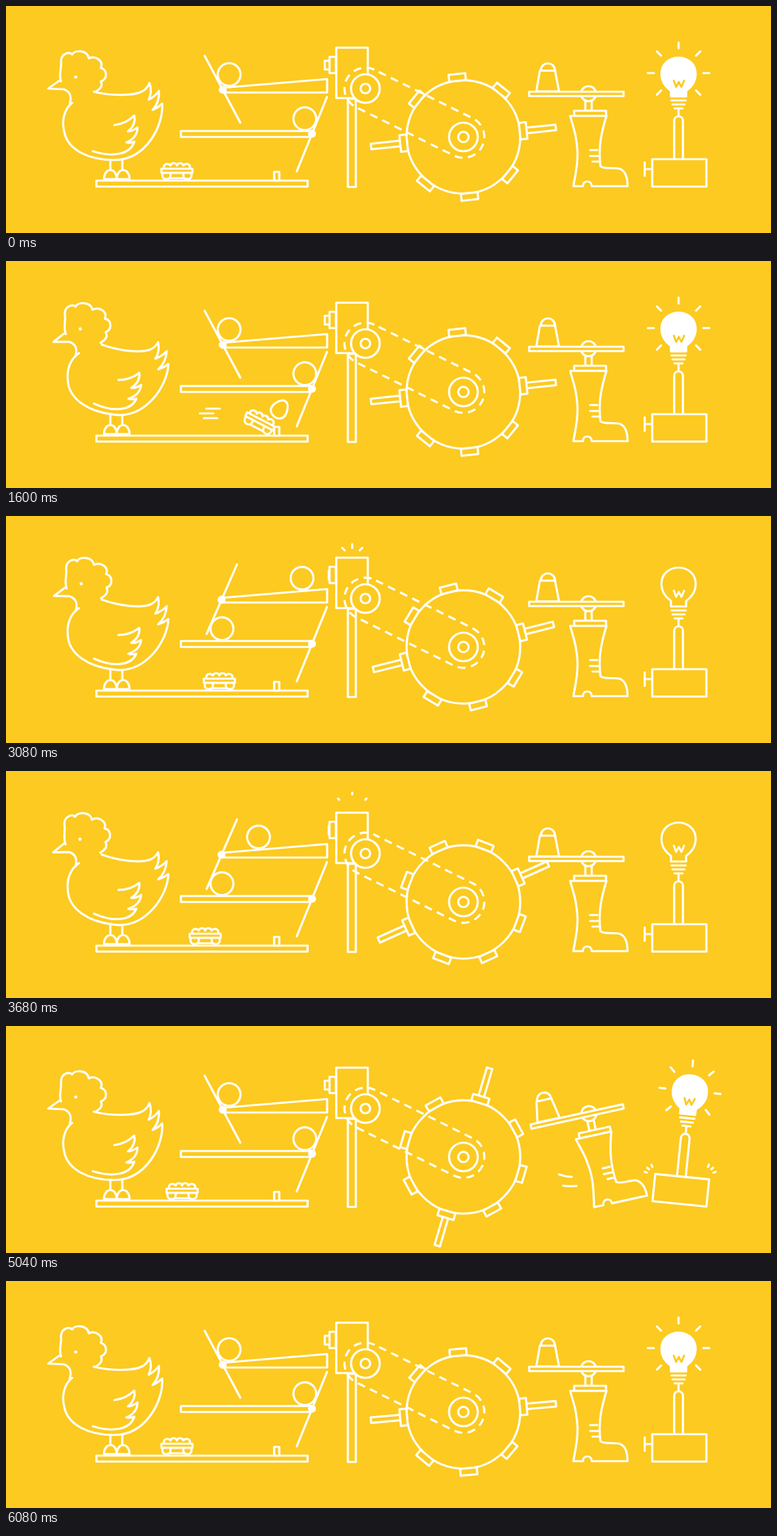
An HTML page with a canvas for the animation above (6.12 s loop, 960 by 286 pixels).

```html
<!DOCTYPE html>
<html lang="en">
<head>
<meta charset="utf-8">
<title>Chain reaction machine</title>
<style>
html, body { margin: 0; width: 100%; height: 100%; overflow: hidden; background: #fcca20; }
canvas { display: block; width: 960px; height: 286px; }
</style>
</head>
<body>
<canvas id="stage" width="960" height="286"></canvas>
<script>
const LOOP = 6120, BG = '#fcca20', INK = '#fff', TAU = Math.PI * 2;
const ctx = document.getElementById('stage').getContext('2d');

// --- timing helpers ---
const clamp = x => Math.max(0, Math.min(1, x));
const lin = u => u;
const smooth = u => u * u * (3 - 2 * u);
const easeIn = u => u * u;
const easeOut = u => 1 - (1 - u) * (1 - u);
const ramp = (t, a, b, ease = smooth) => ease(clamp((t - a) / (b - a)));
const mix = (a, b, u) => a + (b - a) * u;
const during = (t, a, b) => t >= a && t < b;

// keys: [time, value, easing into this key]
function track(t, keys) {
  let [t0, v0] = keys[0];
  if (t <= t0) return v0;
  for (const [t1, v1, ease = smooth] of keys.slice(1)) {
    if (t < t1) return mix(v0, v1, ease((t - t0) / (t1 - t0)));
    t0 = t1; v0 = v1;
  }
  return v0;
}

// --- drawing helpers ---
const paths = {};
const path = d => paths[d] || (paths[d] = new Path2D(d));
const line = d => ctx.stroke(path(d));
function shape(d) {
  ctx.fill(path(d));
  ctx.stroke(path(d));
}
function seg(x1, y1, x2, y2) {
  ctx.beginPath();
  ctx.moveTo(x1, y1);
  ctx.lineTo(x2, y2);
  ctx.stroke();
}
function rect(x1, y1, x2, y2) {
  ctx.beginPath();
  ctx.rect(x1, y1, x2 - x1, y2 - y1);
  ctx.fill();
  ctx.stroke();
}
function circle(x, y, r) {
  ctx.beginPath();
  ctx.arc(x, y, r, 0, TAU);
  ctx.fill();
  ctx.stroke();
}
function dot(x, y, r) {
  ctx.save();
  ctx.fillStyle = INK;
  ctx.beginPath();
  ctx.arc(x, y, r, 0, TAU);
  ctx.fill();
  ctx.restore();
}
function place(x, y, deg, draw) {
  ctx.save();
  ctx.translate(x, y);
  ctx.rotate(deg * Math.PI / 180);
  draw();
  ctx.restore();
}
const spin = (x, y, deg, draw) => place(x, y, deg, () => {
  ctx.translate(-x, -y);
  draw();
});
function ray(x, y, deg, r1, r2) {
  const a = deg * Math.PI / 180, c = Math.cos(a), s = Math.sin(a);
  seg(x + c * r1, y + s * r1, x + c * r2, y + s * r2);
}

// --- chicken, egg and cart ---
function chicken(t) {
  const lean = 6.5 * (ramp(t, 120, 560) - ramp(t, 4600, 4960));
  const active = ramp(t, 640, 780) - ramp(t, 4560, 4720);
  const nod = -10.2 * active * (0.5 - 0.5 * Math.cos(TAU * (t - 2360) / 540));
  line('M131 192V207M146 192V207');
  spin(139, 195, lean, () => {
    shape('M110 108C130 113 160 114 172 107Q178 103 180 97Q184 108 179 118Q187 114 192 107' +
      'Q193 121 184 131Q191 128 196 123C198 150 176 194 136 194C103 194 77 181 73 158' +
      'C70 146 72 131 83 122');
    line('M136 150C145 149 154 145 161 138C163 147 158 154 153 158C157 158 161 156 165 153' +
      'C165 163 158 169 151 172C155 173 158 172 161 171C156 187 134 191 109 183');
    spin(97, 129, nod, () => {
      line('M67 94L53 104L73 105C80 108 83 113 80 123');
      line('M69 95C66 86 70 78 69 70C69 60 79 57 83 61C86 55 102 55 104 66' +
        'C112 62 123 69 119 78C127 80 128 92 119 95C122 101 118 105 112 108');
      dot(87.5, 89.5, 2.1);
    });
  });
  shape('M123 218C123 203 139 203 139 218Z');
  shape('M139 218C139 203 155 203 155 218Z');
}

function cartX(t) {
  if (t < 1800) return mix(214.5, 315, ramp(t, 760, 1500, u => u ** 1.6));
  const rest = Math.max(0, 5.76 - t / 1000);
  return Math.min(315, 214.5 + 11 * rest ** 1.6);
}

function eggPose(t) {
  if (t < 600) {
    const u = clamp((t - 340) / 260);
    return [mix(178, 207, easeOut(u)), mix(166, 191, easeIn(u)), 35];
  }
  if (t < 1500) return [cartX(t) - 7.5, 191, 35];
  if (t < 1660) {
    const u = (t - 1500) / 160;
    return [mix(307.5, 365, u), 191 - 5 * u - 6 * u * (1 - u), 35];
  }
  const s = (t - 1660) / 1000;
  return [365 + 110 * s, 186 + 43 * s + 543 * s * s, 35 + 260 * s];
}

function egg(t) {
  if (!during(t, 340, 2160)) return;
  place(...eggPose(t), () =>
    shape('M0 -12C6 -12 10 -2 10 3C10 9 5 12 0 12C-5 12 -10 9 -10 3C-10 -2 -6 -12 0 -12Z'));
}

function cart(t) {
  const x = cartX(t);
  const tip = 27.5 * (ramp(t, 1490, 1590, easeOut) - ramp(t, 1640, 1850, easeIn));
  spin(x + 13.5, 212.5, tip, () => {
    ctx.translate(x, 213);
    shape('M-16 -8C-18 -14 -11 -16 -8 -12C-7 -16 -1 -16 0 -12C1 -16 7 -16 8 -12C11 -16 18 -14 16 -8');
    shape('M-15 -3L-12 4H12L15 -3Z');
    circle(-13.2, 0, 5.2);
    circle(13.2, 0, 5.2);
    rect(-19.5, -8, 19.5, -2.8);
  });
  if (during(t, 1300, 1680)) {
    const dx = mix(-16, 2, ramp(t, 1300, 1680, lin));
    for (const [x1, x2, y] of [[253, 270, 186], [245, 262, 192], [250, 267, 198]])
      seg(x1 + dx, y, x2 + dx, y);
  }
}

// --- ramps, levers and balls ---
function lever(x, y, deg, up, down) {
  place(x, y, deg, () => seg(0, -up, 0, down));
  dot(x, y, 5);
}

function ramps(t) {
  rect(113.5, 220, 378.5, 227.5);
  rect(336.5, 209, 343, 220);
  rect(219.5, 157.5, 382, 165);
  shape('M272 103L403 92V109H272Z');

  const low = track(t, [[1750, 375], [2130, 307, lin], [2290, 271, easeOut],
    [3850, 271], [3960, 307, easeIn], [4440, 375, easeOut]]);
  const back = (t - 2600) / 1000;
  const high = t < 2600
    ? track(t, [[2190, 280], [2590, 385, u => u ** 0.88]])
    : Math.max(280, 385 - 58.3 * back * back);
  circle(low, 142, 14.3);
  circle(high, mix(86.3, 77.2, (high - 280) / 105), 14.3);

  lever(384, 161, track(t, [[1660, 22], [1780, -12, easeOut], [2400, 21], [2500, 22]]), 50, 51);
  const swing = track(t, [[2120, -28], [2290, 23.5], [3843, 23.5], [3970, -28]]);
  lever(mix(272, 270.5, (swing + 28) / 51.5), 105.5, swing, 48.5, 47);

  if (during(t, 2230, 2520)) seg(high - 36, 87, high - 26, 86);
  if (during(t, 1860, 2420)) seg(low + 23, 141, Math.min(366, low + 54), 141);
}

// --- motor, belt and wheel ---
function wheelAngle(t) {
  return track(t, [[2600, -5.9], [3680, -24.3, lin], [4520, -37.5, lin],
    [5040, -73.5, u => 0.22 * u + 0.78 * u * u], [5160, -87, lin],
    [5760, -135, lin], [6040, -182.5, lin], [6120, -185.9, easeOut]]);
}

function motor(t) {
  rect(429, 117, 439, 228);
  rect(414.5, 52.5, 454, 116);
  const press = 5 * (ramp(t, 2550, 2610) - ramp(t, 4100, 4300));
  rect(400 + press, 69, 407 + press, 80);
  rect(406, 64, 414, 84.5);
  circle(451, 104, 18);
  circle(451, 104, 6);
  if (during(t, 2700, 3820)) {
    const u = ramp(t, 2700, 3820, easeOut), far = mix(1, 21, u);
    const len = mix(8, 2, u);
    seg(434.5, 48 - far, 434.5, 48 - far + len);
    for (const s of [-1, 1]) {
      const x = 434.5 + s * (5 + far * 0.62), y = 48 - far * 0.64;
      seg(x, y, x - s * len * 0.7, y + len * 0.7);
    }
  }
}

function wheel(deg) {
  circle(574, 165, 71.3);
  place(574, 165, deg, () => {
    for (let i = 0; i < 8; i++) {
      if (i % 4 === 0) rect(79, -3.5, 116.5, 3.5);
      rect(71, -10.5, 79.7, 10.5);
      ctx.rotate(Math.PI / 4);
    }
  });
  circle(574, 165, 18);
  circle(574, 165, 6.5);
}

function belt(deg) {
  const x1 = 451, y1 = 104, x2 = 574, y2 = 165, r = 26.3;
  const a = Math.atan2(y2 - y1, x2 - x1), q = Math.PI / 2;
  const step = (2 * Math.hypot(x2 - x1, y2 - y1) + TAU * r) / 26;
  ctx.save();
  ctx.lineCap = 'butt';
  ctx.setLineDash([step * 0.59, step * 0.41]);
  ctx.lineDashOffset = -5.6 - (deg + 5.9) / 180 * 5 * step;
  ctx.beginPath();
  ctx.moveTo(x1 + r * Math.cos(a - q), y1 + r * Math.sin(a - q));
  ctx.arc(x2, y2, r, a - q, a + q);
  ctx.arc(x1, y1, r, a + q, a + 3 * q);
  ctx.stroke();
  ctx.restore();
}

// --- seesaw with boot ---
function boot(t) {
  const tilt = track(t, [[3680, 0], [4520, 17.4, lin], [4560, 17.8, lin],
    [4860, -12.8, easeIn], [5060, -12.4], [5600, 0]]);
  spin(731, 108, tilt, () => {
    rect(727, 117, 735, 132);
    circle(731, 110.5, 9.5);
    rect(656.5, 108, 775, 113.5);
    shape('M671 82C671 69 689 69 689 82Z');
    shape('M670 81.5H689L694 107.5H665.5Z');
    rect(713, 132, 753, 138.5);
    shape('M708 138.5H753.5C747 160 743 178 746 202C751 206 762 203 770 205C778 208 780 216 780 227' +
      'H735C735 219 724 219 724 227H712C716 206 719 190 716 172C715 160 711 150 708 138.5Z');
    line('M733 181.5H742M733 189H743M736 196H745');
  });
  if (during(t, 4780, 5140)) line('M694 187Q702 190 710 190M699 201Q707 202.5 716 201.5');
}

// --- lamp ---
function isLit(t) {
  return t < 1200 || during(t, 1280, 1680) || during(t, 1760, 1840) || t >= 4860;
}

function lamp(t) {
  const tilt = track(t, [[4840, 0], [4970, 6.3, easeOut], [5040, 5.7], [5440, 0]]);
  const knob = 10 * (ramp(t, 4820, 4870) - ramp(t, 5300, 5640));
  const lit = isLit(t);
  spin(879, 227, tilt, () => {
    ctx.save();
    ctx.translate(knob, 0);
    line('M801.5 197V214M801.5 205.5H811');
    ctx.restore();
    shape('M838.5 193V145C838.5 137 849.5 137 849.5 145V193');
    rect(811, 193, 879, 227.5);
    line('M835 119H853M836.5 124H851.5M839 129H849M844 129V138');
    ctx.save();
    if (lit) ctx.fillStyle = INK;
    shape('M834.5 114V107C829 103 822.5 96 822.5 86C822.5 58 865.5 58 865.5 86' +
      'C865.5 96 859 103 853.5 107V114Z');
    ctx.strokeStyle = lit ? BG : INK;
    ctx.lineWidth = 2.4;
    line('M838 94L841 102L844.3 95.5L847.6 102L851 94');
    ctx.restore();
    if (lit) for (let a = 135; a <= 405; a += 45) ray(844, 84.5, a, 31, 38.5);
  });
  if (during(t, 4880, 5240)) {
    const r = mix(9, 14, ramp(t, 4880, 5040, easeOut));
    for (const a of [200, 223, 247]) {
      ray(816, 189, a, r - 1.5, r + 1.5);
      ray(876, 189, 540 - a, r - 1.5, r + 1.5);
    }
  }
}

function draw(t) {
  ctx.fillStyle = BG;
  ctx.fillRect(0, 0, 960, 286);
  ctx.strokeStyle = INK;
  ctx.lineWidth = 2.7;
  ctx.lineCap = ctx.lineJoin = 'round';
  const deg = wheelAngle(t);
  ramps(t);
  egg(t);
  cart(t);
  chicken(t);
  motor(t);
  wheel(deg);
  belt(deg);
  boot(t);
  lamp(t);
}

const start = performance.now();
function tick() {
  draw((performance.now() - start) % LOOP);
  requestAnimationFrame(tick);
}
tick();
</script>
</body>
</html>
```
